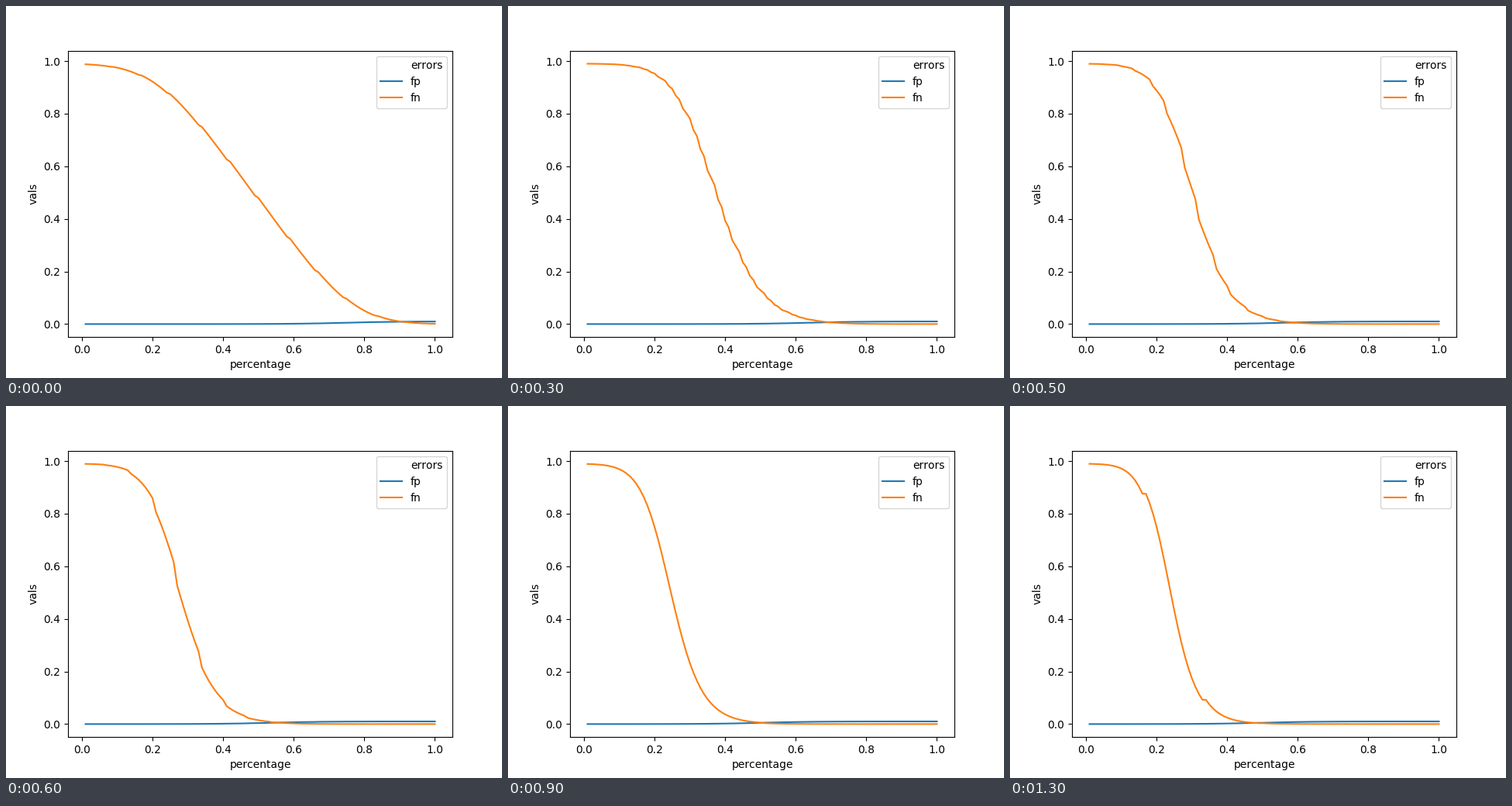
Recreate the animation shown at these times as a matplotlib script. Size 640 px wide and 480 px high, loop 1400 ms.

```python
import numpy as np
import matplotlib.pyplot as plt
from matplotlib.animation import FuncAnimation

FRAMES, INTERVAL = 14, 100
POSITIVE, NEGATIVE = 0.99, 0.01  # class shares
FP_OFFSET, FP_SLOPE = 0.26, 13

percent = np.arange(1, 101)


def sigmoid(x):
    return 1 / (1 + np.exp(-x))


def thresholds(frame):
    """Percentages rounded up to one of the levels left in this frame."""
    levels = int(np.interp(frame, (0, 3, 5, 7, 9, 13), (188, 143, 122, 109, 102, 94)))
    return -(-percent * levels // 100) / levels


def error_curves(frame):
    u = thresholds(frame)
    center = 0.245 + 0.246 * np.exp(-(frame / 4.1) ** 1.6)
    slope = 27 - 20 * np.exp(-frame / 5)
    d = u - center
    # The curve starts symmetric and gains a longer right tail as it steepens.
    fn = POSITIVE * sigmoid(-slope * d + (slope - 7) * d**2 - 24 * d**3)
    fp = NEGATIVE * sigmoid(FP_SLOPE * (d - FP_OFFSET))
    return fp, fn


plt.rcParams["text.kerning_factor"] = 6
fig, ax = plt.subplots(figsize=(6.4, 4.8), dpi=100)
ax.set(xlim=(-0.0395, 1.0495), ylim=(-0.05 * POSITIVE, 1.05 * POSITIVE),
       xlabel="percentage", ylabel="vals")
ax.plot([], [], color="none", label="errors")
fp_line, = ax.plot([], [], color="C0", label="fp")
fn_line, = ax.plot([], [], color="C1", label="fn")
ax.legend(loc="upper right")


def draw(frame):
    for line, values in zip((fp_line, fn_line), error_curves(frame)):
        line.set_data(percent / 100, values)
    return fp_line, fn_line


anim = FuncAnimation(fig, draw, frames=FRAMES, interval=INTERVAL,
                     repeat=True, repeat_delay=0)
plt.show()
```
